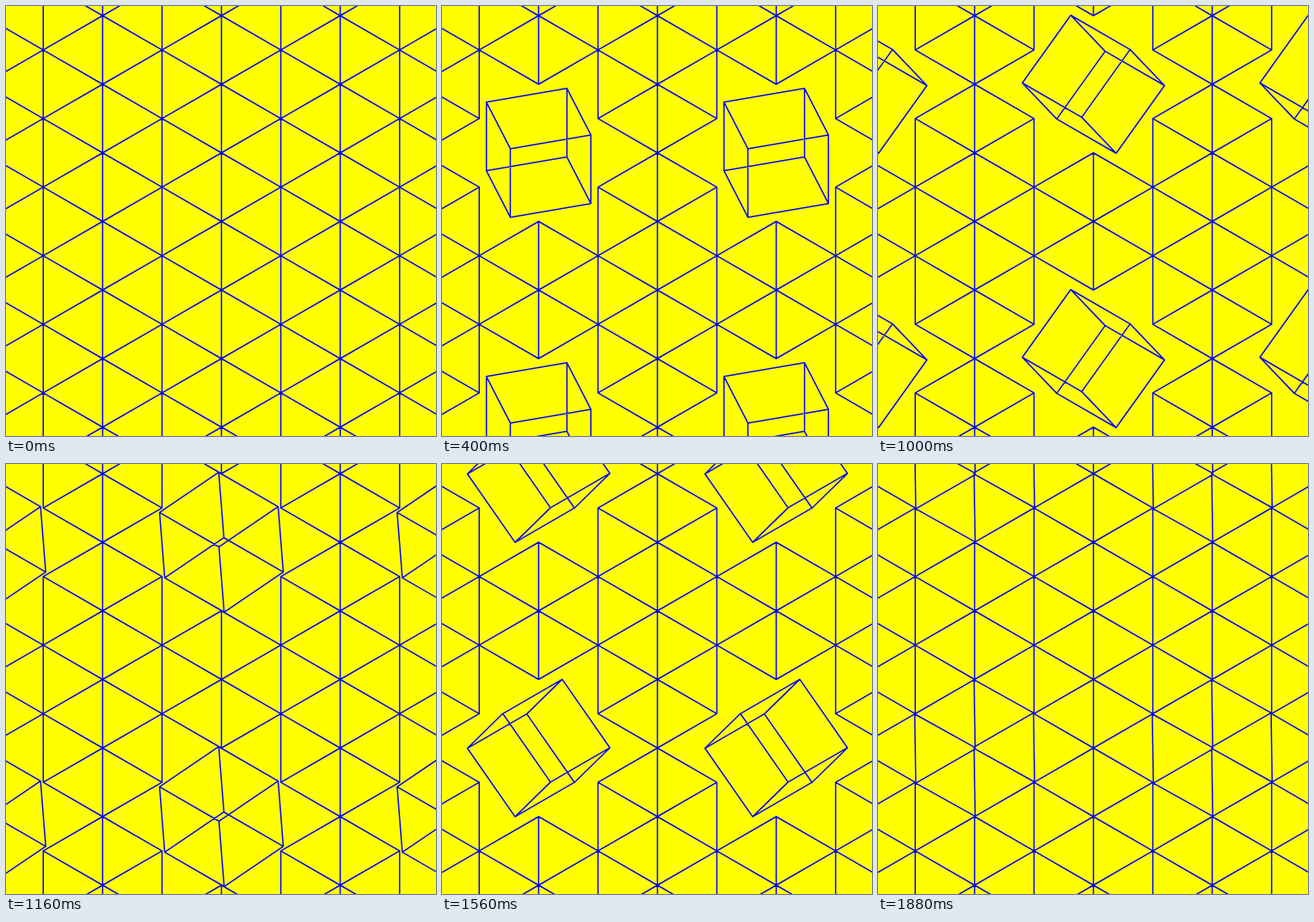
Animation, 500 px wide and 500 px high, one loop 1920 ms. Source, as an HTML page with a canvas:

```html
<!DOCTYPE html>
<html lang="en">
<head>
<meta charset="utf-8">
<title>Turning cubes</title>
<style>
html, body { margin: 0; width: 100%; height: 100%; overflow: hidden; background: #ff0; }
canvas { display: block; }
</style>
</head>
<body>
<canvas id="stage" width="500" height="500"></canvas>
<script>
const ctx = document.getElementById('stage').getContext('2d');

const STEP = 40, STEPS = 48;
const EDGE = 79.75;                    // projected cube edge
const WIDE = EDGE * Math.sqrt(3) / 2;  // half width of a cube outline
const CENTER = 250.5;

// Each group turns about one cube edge direction, between two steps.
const REST = { axis: Math.PI / 2, turn: 0 };
const GROUPS = {
  a: { axis: Math.PI / 2, dir: -1, from: 0, to: 16 },
  b: { axis: Math.PI / 6, dir: 1, from: 17, to: 31 },
  c: { axis: Math.PI * 5 / 6, dir: 1, from: 32, to: 48 }
};

function smooth(x) {
  const t = Math.min(1, Math.max(0, x));
  return t * t * (3 - 2 * t);
}

function pose(group, step) {
  const { axis, dir, from, to } = group;
  return { axis, turn: dir * smooth((step - from) / (to - from)) * Math.PI / 2 };
}

// Orthographic wire cube: two square faces seen as ellipses, joined along the axis.
function addCube(x, y, { axis, turn }) {
  const ax = Math.cos(axis), ay = Math.sin(axis);
  const px = ay, py = -ax;
  const corner = (k, end) => {
    const angle = turn + k * Math.PI / 2;
    const p = WIDE * Math.cos(angle);
    const a = EDGE / 2 * (Math.sin(angle) + end);
    return [x + px * p + ax * a, y + py * p + ay * a];
  };
  for (const end of [-1, 1]) {
    for (let k = 0; k < 4; k++) {
      if (k) ctx.lineTo(...corner(k, end));
      else ctx.moveTo(...corner(k, end));
    }
    ctx.closePath();
  }
  for (let k = 0; k < 4; k++) {
    ctx.moveTo(...corner(k, -1));
    ctx.lineTo(...corner(k, 1));
  }
}

function draw(step) {
  const a = pose(GROUPS.a, step);
  const b = pose(GROUPS.b, step);
  const c = pose(GROUPS.c, step);

  ctx.fillStyle = '#ff0';
  ctx.fillRect(0, 0, 500, 500);
  ctx.beginPath();
  for (let i = -3; i <= 3; i++) {
    const odd = i & 1;
    for (let j = -3; j <= 3; j++) {
      const state = odd ? (j & 1 ? a : c) : (j & 1 ? b : REST);
      addCube(CENTER + i * 2 * WIDE, CENTER + (2 * j + odd) * EDGE, state);
    }
  }
  ctx.strokeStyle = '#00f';
  ctx.lineWidth = 1.5;
  ctx.lineJoin = 'round';
  ctx.stroke();
}

function tick(now) {
  draw(Math.floor((now + 1) / STEP) % STEPS);
  requestAnimationFrame(tick);
}

draw(0);
requestAnimationFrame(tick);
</script>
</body>
</html>
```
